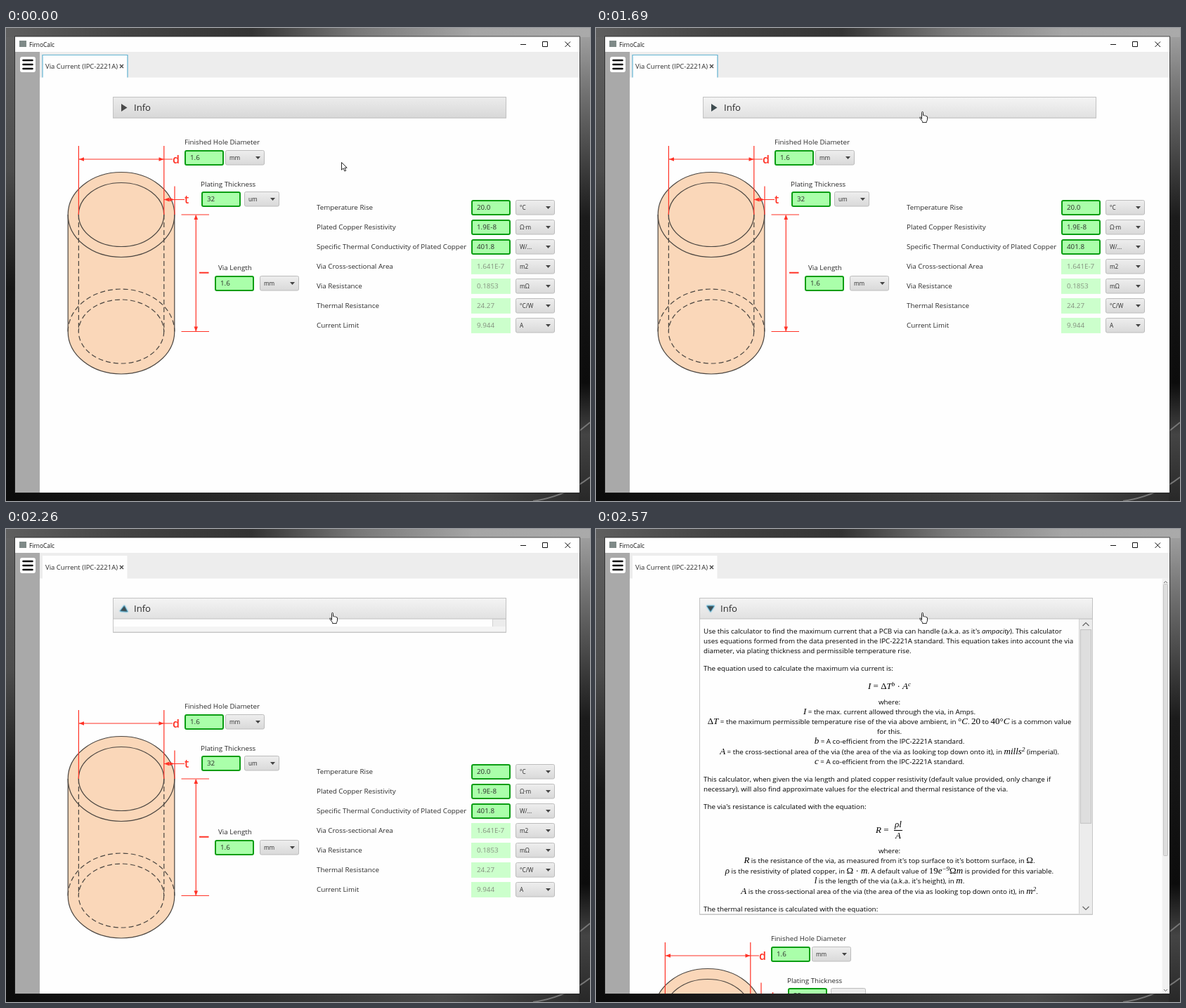
Animation, 831 px wide and 674 px high, one loop 4250 ms. Source, as an HTML page:

```html
<!DOCTYPE html>
<html lang="en">
<head>
<meta charset="utf-8">
<title>Via calculator</title>
<style>
html, body { margin: 0; width: 100%; height: 100%; overflow: hidden; background: #111; }
svg { display: block; width: 831px; height: 674px; }
text { font: 9.8px "Open Sans", "Noto Sans", sans-serif; fill: #2b2b2b; white-space: pre; }
.body text { fill: #000; }
.body .m { font: italic 13px "Liberation Serif", serif; }
.body .r { font: 13px "Liberation Serif", serif; }
.body .s { font-size: 9px; }
.unit { font-size: 8.2px; }
.off { fill: #84907f; }
.red { stroke: #ff3226; fill: none; stroke-width: 1.2; }
.tip { fill: #ff3226; }
.dim { font-size: 16px; font-weight: 600; fill: #ff3226; }
.ink { stroke: #4a4540; fill: none; stroke-width: 1.2; }
.dash { stroke-dasharray: 7 4; }
.chev { fill: none; stroke: #666; stroke-width: 1.2; }
</style>
</head>
<body>
<svg viewBox="0 0 831 674">
  <defs>
    <linearGradient id="wallTop">
      <stop offset="0" stop-color="#5f5f5f"/><stop offset=".2" stop-color="#444"/>
      <stop offset=".42" stop-color="#333"/><stop offset=".6" stop-color="#777"/>
      <stop offset=".8" stop-color="#a5a5a5"/><stop offset="1" stop-color="#aaa"/>
    </linearGradient>
    <linearGradient id="wallLeft" x2="0" y2="1">
      <stop offset="0" stop-color="#626262"/><stop offset=".3" stop-color="#4c4c4c"/>
      <stop offset=".55" stop-color="#161616"/><stop offset="1" stop-color="#0b0b0b"/>
    </linearGradient>
    <linearGradient id="wallRight" x2="0" y2="1">
      <stop offset="0" stop-color="#a5a5a5"/><stop offset=".15" stop-color="#6d6d6d"/>
      <stop offset=".4" stop-color="#1b1b1b"/><stop offset=".75" stop-color="#0c0c0c"/>
      <stop offset=".86" stop-color="#444"/><stop offset="1" stop-color="#282828"/>
    </linearGradient>
    <linearGradient id="wallLow">
      <stop offset="0" stop-color="#0a0a0a"/><stop offset=".4" stop-color="#2b2b2b"/>
      <stop offset=".75" stop-color="#4a4a4a"/><stop offset="1" stop-color="#2c2c2c"/>
    </linearGradient>
    <linearGradient id="combo" x2="0" y2="1">
      <stop offset="0" stop-color="#eee"/><stop offset="1" stop-color="#d9d9d9"/>
    </linearGradient>
    <linearGradient id="bar" x2="0" y2="1">
      <stop offset="0" stop-color="#ececec"/><stop offset="1" stop-color="#d8d8d8"/>
    </linearGradient>
    <linearGradient id="barHover" x2="0" y2="1">
      <stop offset="0" stop-color="#f4f4f4"/><stop offset="1" stop-color="#e1e1e1"/>
    </linearGradient>
    <clipPath id="view"><rect x="48" y="70" width="768" height="592"/></clipPath>
    <clipPath id="paneView"><rect id="paneClip" x="152" y="128" width="560" height="0"/></clipPath>
  </defs>

  <rect width="831" height="674" fill="url(#wallLow)"/>
  <rect width="14" height="674" fill="url(#wallLeft)"/>
  <rect x="815" width="16" height="674" fill="url(#wallRight)"/>
  <rect width="831" height="13" fill="url(#wallTop)"/>
  <path d="M816 574L831 562M750 674Q795 668 831 640" stroke="#777" stroke-width="2" fill="none"/>
  <rect x="12" y="11.5" width="805" height="651.5" fill="#222" opacity=".7"/>

  <rect x="13" y="12.5" width="803" height="649.5" fill="#fefefe"/>
  <rect x="19" y="18" width="10" height="9" fill="#7f8a88"/>
  <text x="33" y="26.5" style="font-size:8.4px;fill:#111">FirnoCalc</text>
  <path d="M732 23.5h8M763.5 19.5h7v7h-7zM795.5 19.5l7.5 7.5M803 19.5l-7.5 7.5" fill="none" stroke="#111"/>
  <rect x="13" y="34" width="35" height="628" fill="#a9a9a9"/>
  <rect x="20" y="41" width="22" height="22" rx="3" fill="#fff"/>
  <path d="M24.5 46h13M24.5 52h13M24.5 58h13" stroke="#111" stroke-width="2.6" stroke-linecap="round"/>
  <rect x="48" y="34" width="768" height="36.5" fill="#ededed"/>
  <rect x="52" y="38" width="120.5" height="33" fill="#fefefe"/>
  <path id="tabFocus" d="M52 70.5V38.5H173V70.5" fill="none" stroke="#62b4d2" stroke-width="1.2"/>
  <text x="56" y="58" style="font-size:9.5px">Via Current (IPC-2221A)</text>
  <path d="M162 52l5 5M167 52l-5 5" stroke="#444" stroke-width="1.3"/>

  <g clip-path="url(#view)">
    <g id="page">
      <g id="form"></g>
      <rect id="paneBox" x="152.5" y="98.5" width="559" fill="#f4f4f4" stroke="#c6c6c6"/>
      <g clip-path="url(#paneView)">
        <rect x="153" y="128" width="540" height="430" fill="#fefefe"/>
        <g id="body" class="body"></g>
        <rect x="692.5" y="128" width="19" height="430" fill="#ececec" stroke="#d2d2d2"/>
        <g id="innerBar">
          <path class="chev" d="M697.5 138l4.5-4.5 4.5 4.5"/>
          <path id="innerDown" class="chev" d="M697.5 -2l4.5 4.5 4.5-4.5"/>
          <rect id="innerThumb" x="694.5" y="143.5" width="15" fill="#dedede" stroke="#c2c2c2"/>
        </g>
      </g>
      <path id="paneEdge" fill="none" stroke="#c6c6c6"/>
      <rect id="header" x="152.5" y="98.5" width="559" height="29.5" stroke="#c2c2c2"/>
      <path id="arrow" d="M-4 -5.5L4.5 0L-4 5.5Z" stroke-width=".7"/>
      <text x="182" y="118" style="font-size:13.1px">Info</text>
    </g>
    <g id="outerBar">
      <rect x="805.5" y="70" width="10.5" height="592" fill="#f1f1f1"/>
      <path class="chev" d="M808 77l2.5-2.5 2.5 2.5M808 656l2.5 2.5 2.5-2.5" style="stroke-width:1"/>
      <rect id="outerThumb" x="807.5" y="78.5" width="6" rx="1" fill="#dedede" stroke="#c4c4c4"/>
    </g>
  </g>

  <path id="pointer" d="M.5 .5V11.2L3 8.8L4.9 13L6.7 12.2L4.9 8.2H8.2Z" fill="#fff" stroke="#111" stroke-width=".9"/>
  <path id="hand" fill="#fff" stroke="#111" stroke-width=".9" d="M3.5 10.5V1.5Q3.5 .4 4.5 .4T5.5 1.5V5.6Q6.8 4.8 7.5 6Q8.8 5.3 9.5 6.6Q11.5 6.2 11.5 8V11Q11.5 13 10.3 14.2V15.6H4.6V14.2L1 9.6Q.3 8.2 1.5 7.8Z"/>
</svg>
<script>
const $ = id => document.getElementById(id);
const set = (id, attrs) => {
  for (const key in attrs) $(id).setAttribute(key, attrs[key]);
};
const show = (id, on) => { $(id).style.display = on ? '' : 'none'; };

const label = (x, y, text, cls = '') => `<text x="${x}" y="${y}" class="${cls}">${text}</text>`;
const input = (x, y, text, on = true) =>
  (on ? `<rect x="${x + 1}" y="${y + 1}" width="54" height="19.9" rx="2" fill="#aaffaa" stroke="#0a9d12" stroke-width="2"/>`
      : `<rect x="${x}" y="${y}" width="56" height="21.9" fill="#ccffcc"/>`) +
  label(x + 8, y + 14, text, on ? '' : 'off');
const combo = (x, y, text, w = 56) =>
  `<rect x="${x + .5}" y="${y + .5}" width="${w - 1}" height="20.5" rx="2" fill="url(#combo)" stroke="#bcbcbc"/>` +
  label(x + 6, y + 14, text, 'unit') +
  `<path d="M${x + w - 13} ${y + 9}h7l-3.5 4z" fill="#444"/>`;
const tip = (x, y, angle) =>
  `<path class="tip" d="M0 0L-7 -2.8V2.8Z" transform="translate(${x} ${y}) rotate(${angle})"/>`;
const ring = (cy, rx, ry, cls) => `<ellipse cx="164" cy="${cy}" rx="${rx}" ry="${ry}" class="${cls}"/>`;

function drawForm() {
  const tube = 'M88.2 266A75.8 60.5 0 0 1 239.8 266V432.5A75.8 60.5 0 0 1 88.2 432.5Z';
  const rows = [
    ['Temperature Rise', '20.0', '°C'],
    ['Plated Copper Resistivity', '1.9E-8', 'Ω·m'],
    ['Specific Thermal Conductivity of Plated Copper', '401.8', 'W/...'],
    ['Via Cross-sectional Area', '1.641E-7', 'm2'],
    ['Via Resistance', '0.1853', 'mΩ'],
    ['Thermal Resistance', '24.27', '°C/W'],
    ['Current Limit', '9.944', 'A']
  ];
  $('form').innerHTML =
    `<path d="${tube}" fill="#fad7b9"/><path d="${tube}" class="ink"/>` +
    '<path d="M88.2 266A75.8 60.5 0 0 0 239.8 266" class="ink"/>' +
    ring(266, 60.7, 45.5, 'ink') + ring(432.5, 60.7, 45.5, 'ink dash') +
    '<path class="ink dash" d="M88.2 432.5A75.8 60.5 0 0 1 239.8 432.5M103.4 266V432.5M224.8 266V432.5"/>' +
    '<path class="red" d="M103.4 168V266M224.8 168V266M104 187H237M240 225.5V266M225 244.5H254M249.5 266H289M249.5 432.5H289M270.3 267V432"/>' +
    '<path class="red" d="M275 348.7H288.5" style="stroke-width:2"/>' +
    tip(104, 187, 180) + tip(224.5, 187, 0) + tip(225, 244.5, 180) + tip(239.5, 244.5, 0) +
    tip(270.3, 266, -90) + tip(270.3, 432.5, 90) +
    label(237, 192.6, 'd', 'dim') + label(254, 250, 't', 'dim') +
    label(254, 166, 'Finished Hole Diameter') + input(254, 174, '1.6') + combo(312, 174, 'mm') +
    label(277, 226, 'Plating Thickness') + input(278, 233, '32') + combo(339, 233, 'um', 50) +
    label(302, 345, 'Via Length') + input(297, 353, '1.6') + combo(361, 353, 'mm') +
    rows.map(([name, value, unit], i) => {
      const y = 245 + 28 * i;
      return label(442, y + 14, name) + input(662, y, value, i < 3) + combo(725, y, unit);
    }).join('');
}

// Inline math: *italic*, _upright_, ^raised^
const math = s => s
  .replace(/\*(.+?)\*/g, '<tspan class="m">$1</tspan>')
  .replace(/_(.+?)_/g, '<tspan class="r">$1</tspan>')
  .replace(/\^(.+?)\^/g, '<tspan class="m s" dy="-4">$1</tspan><tspan dy="4">\u200b</tspan>');

function drawBody() {
  const left = [
    [149, 'Use this calculator to find the maximum current that a PCB via can handle (a.k.a. as it\'s <tspan font-style="italic">ampacity</tspan>). This calculator'],
    [163, 'uses equations formed from the data presented in the IPC-2221A standard. This equation takes into account the via'],
    [177, 'diameter, via plating thickness and permissible temperature rise.'],
    [202, 'The equation used to calculate the maximum via current is:'],
    [360, 'This calculator, when given the via length and plated copper resistivity (default value provided, only change if'],
    [374, 'necessary), will also find approximate values for the electrical and thermal resistance of the via.'],
    [399, 'The via\'s resistance is calculated with the equation:'],
    [545, 'The thermal resistance is calculated with the equation:']
  ];
  const middle = [
    [228, '*I*_ = Δ_*T*^b^_ · _*A*^c^'],
    [250, 'where:'],
    [264, '*I* = the max. current allowed through the via, in Amps.'],
    [278, '_Δ_*T* = the maximum permissible temperature rise of the via above ambient, in _°_*C*. _20_ to _40°_*C* is a common value'],
    [292, 'for this.'],
    [306, '*b* = A co-efficient from the IPC-2221A standard.'],
    [321, '*A* = the cross-sectional area of the via (the area of the via as looking top down onto it), in *mills*^2^ (imperial).'],
    [335, '*c* = A co-efficient from the IPC-2221A standard.'],
    [462, 'where:'],
    [476, '*R* is the resistance of the via, as measured from it\'s top surface to it\'s bottom surface, in _Ω_.'],
    [491, '*ρ* is the resistivity of plated copper, in _Ω · _*m*. A default value of _19_*e*^−9^_Ω_*m* is provided for this variable.'],
    [505, '*l* is the length of the via (a.k.a. it\'s height), in *m*.'],
    [520, '*A* is the cross-sectional area of the via (the area of the via as looking top down onto it), in *m*^2^.']
  ];
  $('body').innerHTML =
    left.map(([y, s]) => label(158, y, s)).join('') +
    '<g text-anchor="middle">' + middle.map(([y, s]) => label(422.5, y, math(s))).join('') +
    label(435, 425, math('*ρl*')) + label(435, 441, math('*A*')) + '</g>' +
    label(403, 433, math('*R*_ =_')) + '<path d="M429 429.5h12" stroke="#000"/>';
}

const LOOP = 4250, HOVER = 1460, PRESS = 2070;
// time, x, y
const cursorSteps = [
  [0, 477, 191], [980, 477, 187], [1070, 477, 180], [1140, 475, 171], [1220, 473, 161],
  [1300, 469, 150], [1380, 465, 139], [HOVER, 460, 127], [1540, 460, 124], [1610, 460, 121], [1690, 460, 119]
];
// time, form shift, pane height, empty foot, arrow angle, outer thumb height
const paneSteps = [
  [0, 0, 0, 0, 0, 0], [2170, 22, 1, 0, 0, 0], [2260, 90, 19, 8, -85, 0],
  [2330, 185, 95, 18, -130, 537], [2410, 283, 190, 26, -180, 465],
  [2490, 375, 295, 22, -230, 413], [2570, 421, 421, 1, -270, 387]
];
const stepAt = (steps, t) => steps.filter(s => s[0] <= t).pop();

function render(t) {
  const [, x, y] = stepAt(cursorSteps, t);
  const [, shift, height, foot, angle, thumb] = stepAt(paneSteps, t);
  const hover = t >= HOVER, focus = t >= PRESS;

  show('pointer', !hover);
  show('hand', hover);
  set(hover ? 'hand' : 'pointer', { transform: `translate(${x} ${y})` });
  show('tabFocus', !focus);

  set('page', { transform: `translate(${thumb ? -5 : 0} 0)` });
  set('form', { transform: `translate(0 ${shift})` });
  set('header', { fill: hover ? 'url(#barHover)' : 'url(#bar)' });
  set('arrow', {
    transform: `translate(168 113.5) rotate(${angle})`,
    fill: hover ? '#3f4c50' : '#4a4a4a',
    stroke: focus ? '#3ba7d3' : 'none',
    style: focus ? 'filter:drop-shadow(0 0 1px #58bce2)' : ''
  });

  const inner = Math.max(0, height - foot);
  set('paneBox', { height: 29.5 + height });
  set('paneClip', { height: inner });
  set('paneEdge', { d: `M152.5 128V${128 + height}.5H711.5V128` });
  show('paneEdge', height > 0);
  show('innerBar', inner > 40);
  set('innerDown', { transform: `translate(0 ${120 + inner})` });
  set('innerThumb', { height: Math.max(20, inner * .94 - 119) });
  show('outerBar', thumb > 0);
  set('outerThumb', { height: thumb });
}

drawForm();
drawBody();
const start = performance.now();
function tick() {
  render((performance.now() - start) % LOOP);
  requestAnimationFrame(tick);
}
tick();
</script>
</body>
</html>
```
